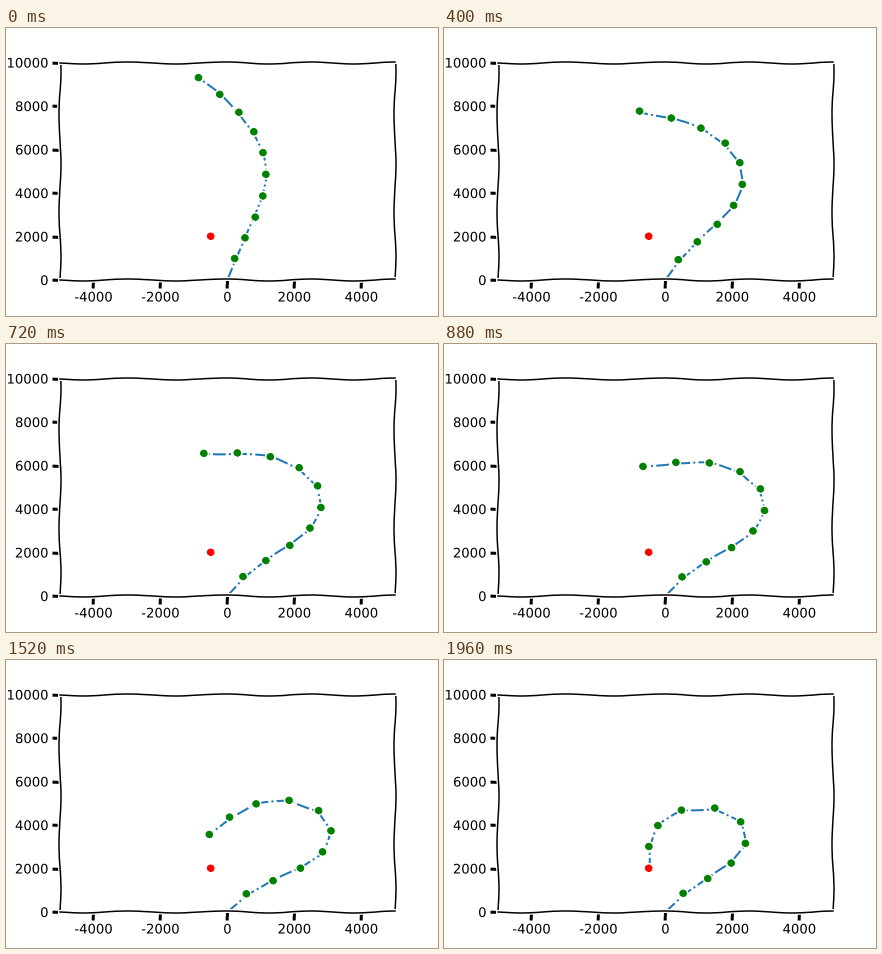
Animation, 432 px wide and 288 px high, one loop 2000 ms. Source, as a matplotlib script:

```python
import numpy as np
import matplotlib.pyplot as plt
from matplotlib import patheffects
from matplotlib.animation import FuncAnimation

FRAMES, INTERVAL = 50, 40
LINK, STEP = 1000, 150
TARGET = np.array([-500, 2000])
# Absolute link angles of the first pose, in degrees clockwise from vertical.
START = [12.5, 18, 17.8, 13.1, 5.2, -4.9, -15.9, -26.5, -34.8, -39.5]

# Hand-drawn look
plt.rcParams.update({
    "font.family": "DejaVu Sans",
    "font.size": 13.2,
    "path.sketch": (1, 100, 2),
    "path.effects": [patheffects.withStroke(linewidth=4, foreground="w")],
    "axes.linewidth": 1.5,
    "axes.unicode_minus": False,
    "lines.linewidth": 2,
    "figure.facecolor": "white",
    "xtick.major.size": 8,
    "xtick.major.width": 3,
    "ytick.major.size": 8,
    "ytick.major.width": 3,
})


def joints(q):
    """Positions of base, joints and tip for relative joint angles q."""
    a = np.cumsum(q)
    links = LINK * np.column_stack([np.sin(a), np.cos(a)])
    return np.vstack([[0, 0], np.cumsum(links, axis=0)])


def advance(q):
    """Move the tip one step towards the target, least joint motion."""
    p = joints(q)
    arm = p[-1] - p[:-1]
    jac = np.array([arm[:, 1], -arm[:, 0]])
    err = TARGET - p[-1]
    err = err * min(1, STEP / max(np.hypot(*err), 1e-9))
    return q + np.linalg.pinv(jac) @ err


def solve():
    q = np.diff(np.radians(START), prepend=0)
    poses = []
    for _ in range(FRAMES):
        poses.append(joints(q))
        q = advance(q)
    return poses


poses = solve()

fig = plt.figure(figsize=(6, 4), dpi=72)
ax = fig.add_axes([0.125, 0.125, 0.775, 0.755])
ax.set(xlim=(-5000, 5000), ylim=(0, 10000),
       xticks=range(-4000, 4001, 2000), yticks=range(0, 10001, 2000))

chain, = ax.plot([], [], "-.", color="C0")
dots, = ax.plot([], [], "o", color="g")
ax.plot(*TARGET, "o", color="r")


def draw(i):
    p = poses[i]
    chain.set_data(p[:, 0], p[:, 1])
    dots.set_data(p[1:, 0], p[1:, 1])
    return chain, dots


anim = FuncAnimation(fig, draw, frames=FRAMES, interval=INTERVAL, repeat=True)
plt.show()
```
